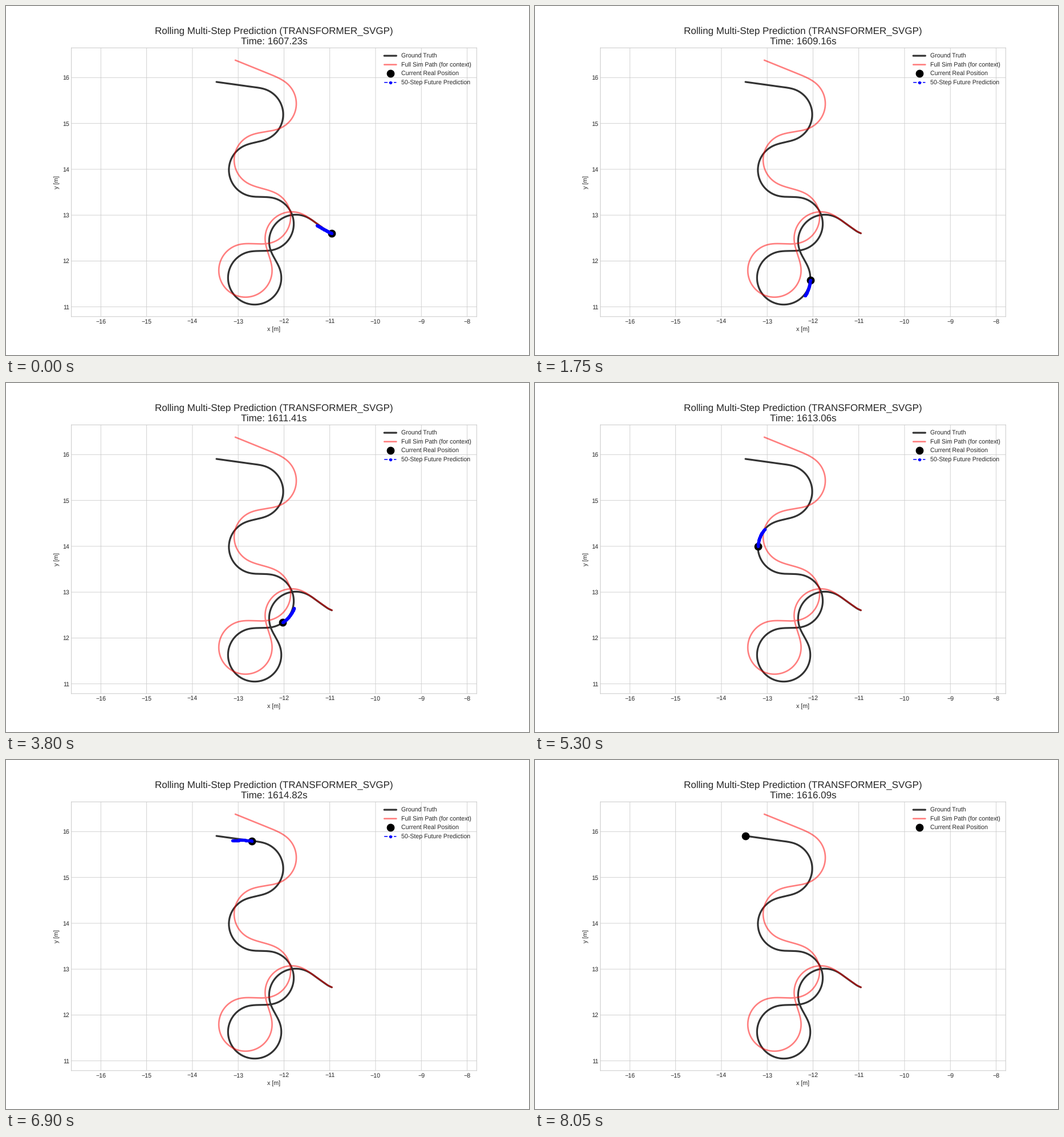
A matplotlib script for the animation above (8.1 s loop, 917 by 611 pixels).

```python
import numpy as np
import matplotlib.pyplot as plt
from matplotlib.animation import FuncAnimation

W, H, DPI = 917, 611, 76.4
FRAMES, INTERVAL = 162, 50
UNIT = 80.27   # pixels per metre
R = 46.7       # turning radius in pixels
BRAKE, STOP, LAST_PRED = 138, 155, 156

plt.style.use("seaborn-v0_8-whitegrid")
plt.rcParams.update({"font.family": "Liberation Sans",
                     "text.hinting": "none", "path.snap": False})


def spline(p, n=1500):
    """Natural cubic spline through the points, with its arc length."""
    t = np.r_[0, np.cumsum(np.hypot(*np.diff(p, axis=0).T))]
    h = np.diff(t)
    slope = np.diff(p, axis=0) / h[:, None]
    A, b = np.eye(len(p)), np.zeros_like(p)
    for k in range(1, len(p) - 1):
        A[k, k - 1:k + 2] = h[k - 1], 2 * (h[k - 1] + h[k]), h[k]
        b[k] = 6 * (slope[k] - slope[k - 1])
    m = np.linalg.solve(A, b)
    q = np.linspace(0, t[-1], n)
    k = np.clip(np.searchsorted(t, q) - 1, 0, len(h) - 1)
    d, hk = (q - t[k])[:, None], h[k][:, None]
    xy = (p[k] + d * (slope[k] - hk * (2 * m[k] + m[k + 1]) / 6)
          + d**2 * m[k] / 2 + d**3 * (m[k + 1] - m[k]) / (6 * hk))
    return xy, np.r_[0, np.cumsum(np.hypot(*np.diff(xy, axis=0).T))]


def drive(centres, tail, start=np.radians(111)):
    """Alternate right and left turns round the centres, then go straight."""
    c, tail = np.array(centres, float), np.array(tail, float)
    first = c[0] + R * np.array([np.cos(start), np.sin(start)])
    joints = np.vstack([first, (c[:-1] + c[1:]) / 2, tail[0]])
    points = []
    for i, centre in enumerate(c):
        sign = 1 if i % 2 == 0 else -1
        rel = joints[i:i + 2] - centre
        a0, a1 = np.arctan2(rel[:, 1], rel[:, 0])
        sweep = sign * (a1 - a0) % (2 * np.pi)
        # Angle over which the steering changes on either side
        room = np.maximum((rel**2).sum(axis=1) - R**2, 0)
        g0, g1 = np.minimum(np.sqrt(3 * room) / R, sweep / 2)
        n = int((sweep - g0 - g1) / 0.2) + 2
        a = a0 + sign * np.linspace(g0, sweep - g1, n)
        points.append(centre + R * np.column_stack([np.cos(a), np.sin(a)]))
        if i < len(c) - 1:
            points.append(joints[i + 1:i + 2])
    points.append(np.linspace(*tail, 6))
    return spline(np.vstack(points))


def to_data(xy):
    return -12 + (xy[:, 0] - 487.4) / UNIT, 16 - (xy[:, 1] - 125.3) / UNIT


truth, dist = drive([(588, 354.3), (508, 412), (436, 476), (457.8, 381.5),
                     (437.5, 287), (439.3, 190)], [(432, 141.6), (369, 132.9)])
sim, _ = drive([(588.5, 354.3), (501, 407), (419.8, 463), (452.3, 369.5),
                (446.7, 269.5), (462.3, 171)], [(466, 120.7), (402, 94.8)])
heading = np.unwrap(np.arctan2(*np.gradient(truth, axis=0).T[::-1]))

# Key positions on the way, in pixels
POSES = {0: truth[0], 35: (483, 480), 55: (394, 496), 76: (486, 420),
         106: (391, 286), BRAKE: (431, 141)}
PASSED = [dist[np.argmin(np.hypot(*(truth - p).T))] for p in POSES.values()]


def travel(i):
    s = np.interp(i, list(POSES), PASSED)
    u = np.clip((i - BRAKE) / (STOP - BRAKE), 0, 1)
    return s + (dist[-1] - PASSED[-1]) * (1 - (1 - u)**2)


def position(s):
    return np.array([[np.interp(s, dist, c) for c in truth.T]])


def predict(i, steps=50, lag=50):
    """Future path whose steering lags half behind the real one."""
    s, j = travel(i), max(i, 1)
    ahead = np.linspace(0, 4.7 * (travel(j) - travel(j - 1)), steps)
    now, before = np.interp([s, s - lag], dist, heading)
    a = (np.interp(s + ahead, dist, heading)
         + now + (now - before) / lag * ahead) / 2
    step = ahead[1] * np.column_stack([np.cos(a), np.sin(a)])
    return position(s) + np.cumsum(step, axis=0) - step[0]


fig = plt.figure(figsize=((W + 1e-6) / DPI, (H + 1e-6) / DPI), dpi=DPI)
ax = fig.add_subplot()
ax.set_xlim(-16.644, -7.791)
ax.set_ylim(10.787, 16.648)
ax.set_xlabel("x [m]")
ax.set_ylabel("y [m]")

truth_line, = ax.plot(*to_data(truth), "k-", lw=3, alpha=0.8,
                      label="Ground Truth")
sim_line, = ax.plot(*to_data(sim), "r-", lw=2.5, alpha=0.5,
                    label="Full Sim Path (for context)")
dot, = ax.plot([], [], "ko", ms=12, label="Current Real Position")
pred, = ax.plot([], [], "bo--", ms=4, lw=1.5,
                label="50-Step Future Prediction")


def update(i):
    dot.set_data(*to_data(position(travel(i))))
    pred.set_data(*to_data(predict(i)))
    shown = i <= LAST_PRED
    pred.set_visible(shown)
    ax.legend(handles=[truth_line, sim_line, dot] + [pred] * shown,
              loc="upper right")
    ax.set_title("Rolling Multi-Step Prediction (TRANSFORMER_SVGP)\n"
                 f"Time: {1607.2305 + 0.055 * i:.2f}s",
                 fontsize=16, linespacing=1.25)
    return dot, pred


anim = FuncAnimation(fig, update, frames=FRAMES, interval=INTERVAL,
                     repeat=True, repeat_delay=0)
plt.show()
```
